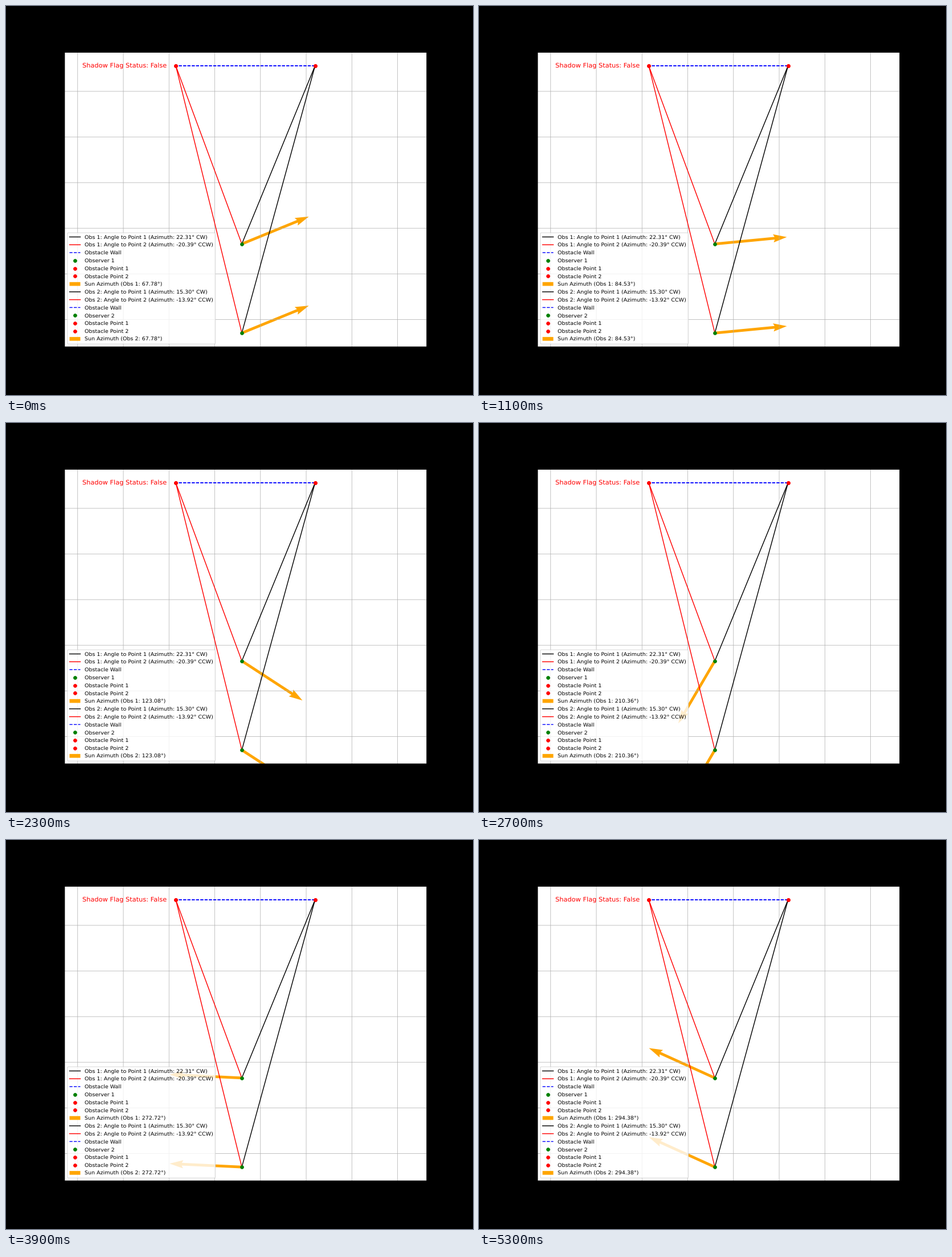
A matplotlib script that plays this animation: 820x683 px, repeating every 5.4 s.

```python
import numpy as np
import matplotlib.pyplot as plt
from matplotlib.animation import FuncAnimation

W, H = 820, 683
DPI = W / 12
FRAMES, INTERVAL = 54, 100

# Stage positions in pixels, y pointing down
LEFT, RIGHT, TOP, BOTTOM = 103.0, 738.7, 81.6, 598.2
POINT_1, POINT_2 = (542.7, 105.0), (298.1, 105.0)
OBSERVERS = [
    ((414.1, 417.8), "22.31° CW", "-20.39° CCW"),
    ((414.1, 574.2), "15.30° CW", "-13.92° CCW"),
]
ARROW = 127

# Sun path: a quarter of an hour per frame
LATITUDE = np.radians(28.4489)
NOON = 25.8532
HOUR_STEP = 3.75


def sun_azimuth(frame):
    k = frame - NOON
    hour = np.radians(HOUR_STEP * k)
    decl = np.radians(21.5397 - 0.001804 * k)
    south = np.cos(hour) * np.sin(LATITUDE) - np.tan(decl) * np.cos(LATITUDE)
    return 180 + np.degrees(np.arctan2(np.sin(hour), south))


def arrow_vector(azimuth):
    a = np.radians(azimuth)
    return ARROW * np.sin(a), -ARROW * np.cos(a)


def sun_label(n, azimuth):
    return f"Sun Azimuth (Obs {n}: {azimuth:.2f}°)"


def segment(a, b, style, label):
    ax.plot([a[0], b[0]], [a[1], b[1]], style, lw=1.5, label=label)


def dot(p, style, label):
    ax.plot([p[0]], [p[1]], style, ms=6, label=label)


def draw_observer(n, pos, angle_1, angle_2):
    segment(pos, POINT_1, "k-", f"Obs {n}: Angle to Point 1 (Azimuth: {angle_1})")
    segment(pos, POINT_2, "r-", f"Obs {n}: Angle to Point 2 (Azimuth: {angle_2})")
    segment(POINT_1, POINT_2, "b--", "Obstacle Wall")
    dot(pos, "go", f"Observer {n}")
    dot(POINT_1, "ro", "Obstacle Point 1")
    dot(POINT_2, "ro", "Obstacle Point 2")
    azimuth = sun_azimuth(0)
    u, v = arrow_vector(azimuth)
    return ax.quiver([pos[0]], [pos[1]], [u], [v], angles="xy", scale_units="xy",
                     scale=1, color="orange", label=sun_label(n, azimuth))


# Soft edges: nothing is rounded to whole pixels
plt.rcParams.update({"font.family": "DejaVu Sans", "text.hinting": "none",
                     "path.snap": False})
# The tiny surplus guards against rounding down to one pixel less
fig = plt.figure(figsize=((W + 1e-3) / DPI, (H + 1e-3) / DPI), dpi=DPI,
                 facecolor="black")
ax = fig.add_axes([LEFT / W, 1 - BOTTOM / H, (RIGHT - LEFT) / W, (BOTTOM - TOP) / H])
ax.set_xlim(LEFT, RIGHT)
ax.set_ylim(BOTTOM, TOP)
ax.set_xticks(125.75 + 80.26 * np.arange(8))
ax.set_yticks(149.9 + 80.1 * np.arange(6))
ax.tick_params(length=0, labelbottom=False, labelleft=False)
ax.grid(True, color="#b0b0b0", lw=0.8)

arrows = [draw_observer(n, *obs) for n, obs in enumerate(OBSERVERS, 1)]
ax.text(133.5, 107.8, "Shadow Flag Status: False", color="red", fontsize=12)
legend = ax.legend(loc="lower left", fontsize=10, labelspacing=0.532)
sun_texts = [legend.get_texts()[i] for i in (6, 13)]


def update(frame):
    azimuth = sun_azimuth(frame)
    u, v = arrow_vector(azimuth)
    for n, (arrow, text) in enumerate(zip(arrows, sun_texts), 1):
        arrow.set_UVC([u], [v])
        text.set_text(sun_label(n, azimuth))
    return [*arrows, *sun_texts]


anim = FuncAnimation(fig, update, frames=FRAMES, interval=INTERVAL,
                     repeat=True, repeat_delay=0, blit=False)
plt.show()
```
